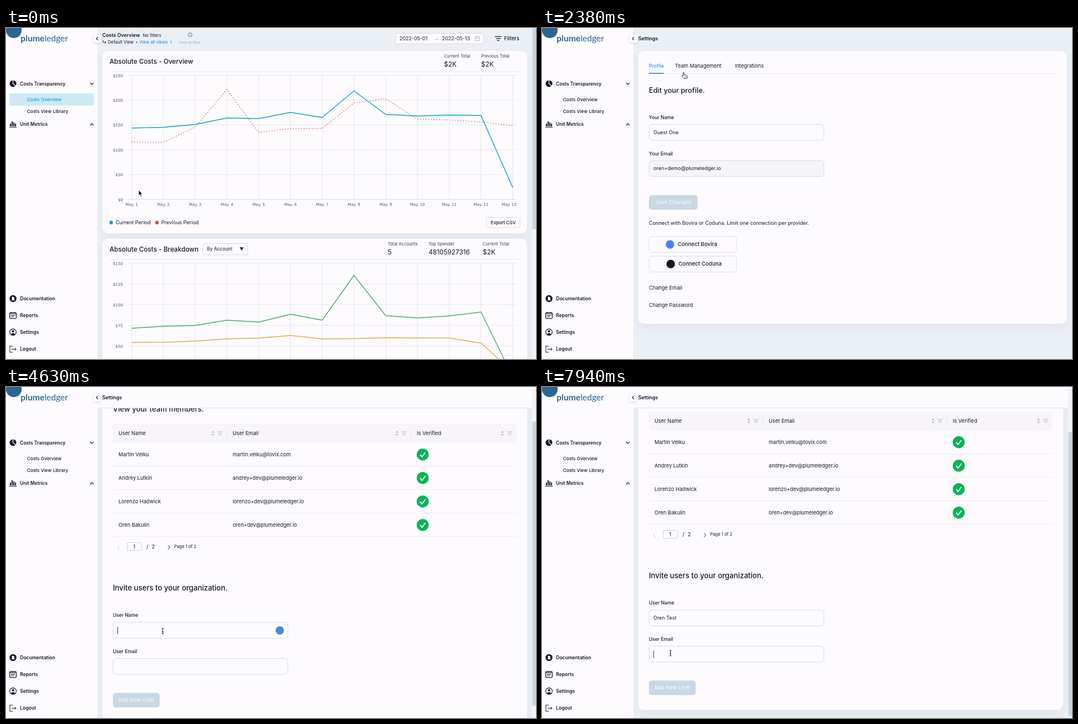
Animation of 947x592 px, one loop 8 s. Source, as an HTML page:

```html
<!DOCTYPE html>
<html lang="en">
<head>
<meta charset="utf-8">
<title>Settings walkthrough</title>
<style>
  html, body { margin: 0; width: 100%; height: 100%; overflow: hidden; background: #ebf0f5; }
  svg { display: block; font-family: Inter, "Open Sans", sans-serif; }
  text { white-space: pre; }
  .axis { font-family: "DejaVu Sans", sans-serif; }
  .brand { font-family: Lato, sans-serif; }
  .card { fill: #fdfbfe; filter: drop-shadow(0 6px 9px rgba(100, 105, 150, .08)); }
  .raised { filter: drop-shadow(0 1px 2px rgba(60, 70, 100, .2)); }
</style>
</head>
<body>
<svg id="stage" width="947" height="592" viewBox="0 0 947 592"></svg>
<script>
const INK = '#16182a', BLUE = '#0aa2d0', LINK = '#1d83cf', PAPER = '#fdfbfe', EDGE = '#cfdae2';
const LOOP = 8000;

// Text is placed by the middle of its capitals.
const text = (x, y, s, size = 9.2, weight = 400, fill = INK, extra = '') =>
  `<text x="${x}" y="${y + size * .36}" font-size="${size}" font-weight="${weight}" fill="${fill}" ${extra}>${s}</text>`;
const rect = (x, y, w, h, fill, r = 0, stroke = 'none', extra = '') =>
  `<rect x="${x}" y="${y}" width="${w}" height="${h}" rx="${r}" fill="${fill}" stroke="${stroke}" ${extra}/>`;
const path = (d, stroke = INK, width = 1, fill = 'none', extra = '') =>
  `<path d="${d}" stroke="${stroke}" stroke-width="${width}" fill="${fill}" ${extra}/>`;
const circle = (x, y, r, fill, extra = '') => `<circle cx="${x}" cy="${y}" r="${r}" fill="${fill}" ${extra}/>`;
const group = (id, body) => `<g id="${id}">${body}</g>`;
const field = (y, fill = PAPER) => rect(191.4, y, 312.3, 28.4, fill, 5, EDGE, 'stroke-width=".9"');
const card = (y, w, h, id = '') => rect(172, y, w, h, '', 10, 'none', `class="card" id="${id}"`);
const END = 'text-anchor="end"', MID = 'text-anchor="middle"';

function sidebar() {
  const menu = [[484, 'Documentation'], [514, 'Reports'], [544, 'Settings'], [574, 'Logout']];
  return rect(0, 0, 163, 592, PAPER) +
    circle(14, 4, 14, '#2c6690') +
    `<text class="brand" x="26" y="24" font-size="15.5" fill="#2c6690"><tspan font-weight="700">plume</tspan>ledger</text>` +
    circle(12.5, 99.5, 6, INK) + path('M12.5 99.5V93M12.5 99.5L17.5 104', PAPER, 1.2) +
    text(25, 99.5, 'Costs Transparency', 8.4, 600) +
    path('M150.3 98l3 3l3-3', INK, 1.2) +
    group('pill', rect(6, 117, 151, 21.5, '#cdeaf4', 3)) +
    text(37.5, 127.8, 'Costs Overview', 8.2, 500, BLUE, 'id="overviewLink"') +
    text(37.5, 149, 'Costs View Library', 8.2, 500) +
    path('M8 171v5M11 167v9M14 169v7M17 171v5', INK, 2) + path('M6 177.5h13', INK, 1) +
    text(25, 172, 'Unit Metrics', 8.4, 600) +
    path('M150.3 174l3-3l3 3', INK, 1.2) +
    menu.map(([y, s]) => text(25, y, s, 8.5, 600)).join('') +
    circle(12.5, 484, 6.2, INK) + path('M10.5 480.8h2.6l2 2v4.4h-4.6z', 'none', 0, PAPER) +
    rect(6.7, 509, 11.6, 10.6, 'none', 1.5, INK, 'stroke-width="1.3"') +
    path('M7 511h11M9 513.8h7M9 516.5h5', INK, 1.2) +
    circle(12.5, 544, 5.8, 'none', `stroke="${INK}" stroke-width="1.2"`) + circle(12.5, 542.3, 2.1, INK) +
    path('M8.5 547.6q4-3.6 8 0q-4 3.4-8 0z', 'none', 0, INK) +
    path('M12 569H7v11h5M10 574.5h8M15.5 572l2.5 2.5l-2.5 2.5', INK, 1);
}

const dayX = i => 224.5 + 56.75 * i;
const series = (ys, color, extra = '') =>
  path('M' + ys.map((y, i) => dayX(i) + ' ' + y).join('L'), color, 1.4, 'none', `stroke-linejoin="round" ${extra}`);

function grid(top, bottom, step, max, unit) {
  let out = '';
  for (let i = 0; i < 13; i++) out += path(`M${dayX(i)} ${top}V${bottom}`, '#e0e0e5', .8);
  for (let y = top, v = max; y <= bottom + 1; y += step, v -= unit)
    out += path(`M218 ${y}H912`, v ? '#e0e0e5' : '#ccd3e4', .8) + text(209, y + .5, '$' + v, 7.1, 400, '#55555c', 'class="axis" ' + END);
  return out;
}
const stat = (x, y, label, value) => text(x, y, label, 7.6, 400, '#3c3d4a') + text(x, y + 14.7, value, 11.7);

function dashboard() {
  let days = '';
  for (let i = 0; i < 13; i++)
    days += text(i == 12 ? 899 : dayX(i), 315.7, 'May. ' + (i + 1), 6.9, 400, '#55555c', 'class="axis" ' + MID);
  return card(41, 759, 326) + card(377, 759, 240) +
    text(172, 13, 'Costs Overview', 8.8, 600) + text(244.5, 13.3, 'No filters', 7.6) +
    path('M173.5 21.5v4.2h5M176.5 23.6l2.2 2.1l-2.2 2.1', INK, .9) +
    text(182, 25.5, 'Default View', 7.7) + circle(233.7, 25.5, 1.1, INK) +
    text(238, 25.5, 'View all views', 7.7, 400, LINK) + path('M293.5 22.8l2.6 2.7l-2.6 2.7', LINK, 1) +
    circle(329, 12.2, 4.4, '#b3b8bf') + path('M326.8 12.2h4.4M329 10v4.4', '#fff', 1) +
    text(309, 25.3, 'Save as New', 6.2, 600, '#b8bdc4') +
    rect(696.5, 9.5, 157, 19, PAPER, 2, '#d5dae0') +
    text(703, 19, '2022-05-01', 8.9) + path('M765.5 20.5h7l-2.2-2.2', '#b5b8c0', .8) + text(779, 19, '2022-05-13', 8.9) +
    path('M838 15.5h8v7h-8zM838 18h8M840 14v2.5M844 14v2.5', '#b5b8c0', .9) +
    path('M873.5 15.3h12M875.5 18.8h8M877.5 22.3h4', INK, 1.3) + text(890, 19, 'Filters', 9.2, 500) +
    text(185, 59.5, 'Absolute Costs - Overview', 11.7, 500) +
    stat(782.5, 50.5, 'Current Total', '$2K') + stat(849, 50.5, 'Previous Total', '$2K') +
    path('M185 78H918', '#e3e3e8', .9) +
    grid(84.5, 306.5, 44.4, 250, 50) + days +
    series([203.5, 204.5, 177, 110, 186.5, 180, 179.5, 134, 126.5, 163, 164.5, 168, 174.5], '#c4515c', 'stroke-dasharray="1.4 3.4"') +
    series([179, 177.5, 172.5, 161, 162, 151, 160, 112.5, 154.5, 157.5, 155.5, 156.5, 285.5], BLUE) +
    circle(188, 348, 3.2, BLUE) + text(196, 348, 'Current Period', 9) +
    circle(269.7, 348, 3.2, '#c4515c') + text(277.5, 348, 'Previous Period', 9) +
    rect(858.5, 339, 60, 18, PAPER, 3, '#d8d9e0') + text(888.5, 348, 'Export CSV', 8.1, 500, INK, MID) +
    text(185, 395.3, 'Absolute Costs - Breakdown', 11.7, 500) +
    rect(351.5, 385.5, 80.5, 20, PAPER, 3, '#d8d9e0') + text(359, 395.3, 'By Account', 8.4) +
    path('M417.5 392.3h7l-3.5 6z', 'none', 0, INK) +
    stat(682, 386.5, 'Total Accounts', '5') + stat(755, 386.5, 'Top Spender', '48105927316') + stat(852, 386.5, 'Current Total', '$2K') +
    path('M185 413.5H918', '#e3e3e8', .9) +
    grid(420.5, 606, 37.1, 150, 25) +
    series([562.5, 562, 560, 556, 554.5, 550, 556, 555.5, 554, 554.5, 554.5, 563.5, 615], '#e3ac48') +
    series([537, 533.5, 532, 522.5, 526, 512, 522.5, 442.5, 514.5, 518.5, 515, 508, 624], '#4cab62');
}

const tabs = (active, right) =>
  [[191, 'Profile'], [237.5, 'Team Management'], [344.7, 'Integrations']]
    .map(([x, s], i) => text(x, 67.5, s, i ? 9.2 : 8.9, 400, i == active ? LINK : INK)).join('') +
  path(`M191 81.5H${right}`, '#e8e8ed', .9);
const button = (y, w, s) => rect(191, y, w, 26, '#c9d8e4', 5) + text(191 + w / 2, y + 13, s, 9.5, 400, '#f8fafc', MID);
const connect = (y, x, s, color) =>
  rect(191.4, y, 156, 28.4, PAPER, 5, '#d8dae0', 'stroke-width=".9"') + circle(x, y + 14.2, 7.6, color) + text(x + 13.8, y + 14, s, 9.6, 500);

function profile() {
  return card(41, 765.5, 422, 'profileCard') + tabs(0, 919) +
    text(191, 111, 'Edit your profile.', 12.7, 500) +
    text(191, 160, 'Your Name', 8.5, 500) + field(172.5) +
    text(191, 224.5, 'Your Email', 8.5, 500) + field(237, '#f6f4f7') +
    button(299, 87, 'Save Changes') +
    text(191, 348.8, 'Connect with Bovira or Coduna. Limit one connection per provider.', 9.1) +
    connect(373, 228.7, 'Connect Bovira', '#4285f4') + connect(408, 230, 'Connect Coduna', '#15161c') +
    group('loaded',
      text(199, 186.5, 'Guest One', 9) + text(199, 251.2, 'oren+demo@plumeledger.io', 9) +
      text(191, 465, 'Change Email') + text(191, 495.7, 'Change Password'));
}

function team() {
  const people = [
    ['Martin Velku', 'martin.velku@tovix.com'], ['Andrey Lutkin', 'andrey+dev@plumeledger.io'],
    ['Lorenzo Hadwick', 'lorenzo+dev@plumeledger.io'], ['Oren Bakulin', 'oren+dev@plumeledger.io']];
  const column = (x, s, sortX, line) => text(x, 154, s, 9.2) +
    path(`M${sortX - 2.6} 153l2.6-3.2l2.6 3.2zM${sortX - 2.6} 155.4l2.6 3.2l2.6-3.2z`, 'none', 0, '#b6b6bd') +
    path(`M${sortX + 8.5} 151.5h9M${sortX + 9.5} 154.3h7M${sortX + 10.5} 157h5`, '#b6b6bd', .9) +
    (line ? path(`M${line} 148.5v11`, '#e2e2e6', 1) : '');
  const row = ([name, mail], i) => {
    const y = 192 + 42 * i;
    return text(201, y, name) + text(405, y, mail) + circle(744.6, y + .2, 10.7, '#07b457') +
      path(`M740 ${y + .7}l3.4 3.8l6-8`, '#fff', 2) + path(`M191 ${y + 21}H912.5`, '#ececf0', .9);
  };
  return card(41, 759, 630) + tabs(1, 912.5) +
    text(191, 110.8, 'View your team members.', 13, 500) +
    rect(191, 137.5, 721.5, 33.5, '#f7f5f8') +
    column(201, 'User Name', 369.5, 394.5) + column(405, 'User Email', 698.5, 723.5) + column(734, 'Is Verified', 887) +
    people.map(row).join('') +
    path('M202.7 355l-3.6 3.5l3.6 3.5', '#b6b6bd', .9) + rect(216.5, 350, 25.5, 14, PAPER, 1.5, '#cfcfd5') +
    text(229, 357, '1', 9, 400, INK, MID) + text(251, 357, '/', 9.5) + text(260.5, 357, '2', 9) +
    path('M289.3 355l3.6 3.5l-3.6 3.5', INK, 1) + text(300.5, 357, 'Page 1 of 2', 7.6) +
    text(191, 430.8, 'Invite users to your organization.', 13.1, 500) +
    text(191, 479.8, 'User Name', 8.5, 500) + field(492.5) +
    text(199, 506.5, '', 9, 400, INK, 'id="typed"') + circle(489.2, 506.8, 7.4, '#4b88d2', 'id="helper"') +
    text(191, 544.3, 'User Email', 8.5, 500) + field(557) +
    button(618.5, 83.5, 'Add New User') +
    rect(0, 0, .9, 12.5, INK, 0, 'none', 'id="caret"');
}

const header = rect(163, 0, 777, 37.5, PAPER, 0, 'none', 'id="headerFill"') +
  path('M163 37.5H940', '#dfe3e9', 1, 'none', 'id="headerLine"');
const pointers = group('arrow', path('M0 0v9.6l2.2-2l1.6 3.6l1.7-.8l-1.6-3.4h3z', '#fff', .7, '#111')) +
  group('hand', path('M-.9 1q.9-1.5 1.9 0v3.6l4.6.9q1.4.5 1.1 2.2l-.8 3.7h-5.2l-3.6-4.3q0-1.5 1.9-.4z', '#222', .9, '#fff') +
    path('M1.6 7.5v2M3.2 7.5v2M4.8 7.5v2', '#222', .6)) +
  group('beam', path('M-2-5q2 0 2 1.4q0-1.4 2-1.4M0-4V4M-2 5q2 0 2-1.4q0 1.4 2 1.4M-1.2.9h2.4', '#222', 1));

document.getElementById('stage').innerHTML =
  rect(0, 0, 947, 592, '#ebf0f5') +
  group('dashboard', dashboard()) + group('profile', profile()) + group('team', team()) +
  rect(191, 80.3, 26.5, 1.6, '#1d86dc', 0, 'none', 'id="ink"') +
  header + sidebar() +
  rect(156, 12, 14, 14, PAPER, 3, 'none', 'class="raised"') + path('M164.2 16.2l-2.8 2.8l2.8 2.8', INK, 1.1) +
  text(172, 18.8, 'Settings', 8.9, 600, INK, 'id="title"') +
  group('bar', rect(940, 0, 7, 592, '#f2f4f8') + rect(940.5, 0, 6.5, 508, '#cad4e2', 0, 'none', 'id="thumb"')) +
  group('pointer', pointers);

const ui = {};
document.querySelectorAll('[id]').forEach(el => ui[el.id] = el);
const show = (id, on) => ui[id].style.display = on ? '' : 'none';
const clamp = v => Math.min(1, Math.max(0, v));
const smooth = (t, a, b) => { const k = clamp((t - a) / (b - a)); return k * k * (3 - 2 * k); };
const easeOut = (t, a, b) => 1 - (1 - clamp((t - a) / (b - a))) ** 3;

const OPEN = 1570, UNDERLINE = 1700, LOADED = 1900, TEAM = 2620, FOCUS = 4440, REFOCUS = 7620;
const NAME = 'Oren Test', KEYS = [5000, 5250, 5560, 5690, 5940, 6000, 6190, 6310, 6560];
// Pointer stops: time, x, y
const STOPS = [[0, 237, 290], [60, 237, 290], [1150, 35.5, 546], [1690, 35.5, 546], [2380, 253, 79], [2460, 262, 70],
  [2720, 262, 70], [3620, 315.5, 475.5], [4150, 315.5, 475.5], [4400, 280, 436.5], [7000, 280, 436.5], [7560, 229.5, 476], [LOOP, 229.5, 476]];

function movePointer(t) {
  const i = STOPS.findIndex(s => s[0] > t);
  const [t0, x0, y0] = STOPS[i - 1], [t1, x1, y1] = STOPS[i];
  const k = smooth(t, t0, t1);
  ui.pointer.setAttribute('transform', `translate(${x0 + (x1 - x0) * k} ${y0 + (y1 - y0) * k})`);
  const kind = t > 4320 ? 'beam' : (t > 1000 && t < 1770) || (t > 2320 && t < 2860) ? 'hand' : 'arrow';
  for (const id of ['arrow', 'hand', 'beam']) show(id, id == kind);
  show('pointer', t < KEYS[0] || t >= 7000);
}

function render(t) {
  const page = t < OPEN ? 'dashboard' : t < TEAM ? 'profile' : 'team';
  for (const id of ['dashboard', 'profile', 'team']) show(id, id == page);
  show('title', page != 'dashboard');
  show('pill', page == 'dashboard');
  ui.overviewLink.setAttribute('fill', t < 1720 ? BLUE : INK);

  show('loaded', t >= LOADED);
  ui.profileCard.setAttribute('height', t < LOADED ? 422 : 488);

  const scroll = 71.5 * smooth(t, 3730, 4130) + 22 * easeOut(t, 7300, 7920);
  const slide = smooth(t, TEAM, TEAM + 300);
  ui.team.setAttribute('transform', `translate(0 ${-scroll})`);
  show('ink', t >= UNDERLINE);
  ui.ink.setAttribute('x', 191 + 46.8 * slide);
  ui.ink.setAttribute('width', 26.5 + 60.5 * slide);
  ui.ink.setAttribute('transform', `translate(0 ${-scroll})`);
  show('headerFill', scroll > 2);
  show('headerLine', scroll > 2);
  show('bar', page != 'profile');
  ui.thumb.setAttribute('y', scroll * .865);
  ui.thumb.setAttribute('height', page == 'dashboard' ? 360 : 508);

  const typed = NAME.slice(0, KEYS.filter(k => t >= k).length);
  if (ui.typed.textContent != typed) ui.typed.textContent = typed;
  const inEmail = t >= REFOCUS;
  show('helper', t >= FOCUS && !inEmail);
  show('caret', t >= FOCUS && (t < 7060 || t >= 7560));
  ui.caret.setAttribute('x', 199 + (inEmail || !typed ? 0 : ui.typed.getComputedTextLength() + .3));
  ui.caret.setAttribute('y', inEmail ? 565 : 500.5);
  movePointer(t);
}

const start = performance.now();
function tick() {
  render((performance.now() - start) % LOOP);
  requestAnimationFrame(tick);
}
tick();
</script>
</body>
</html>
```
